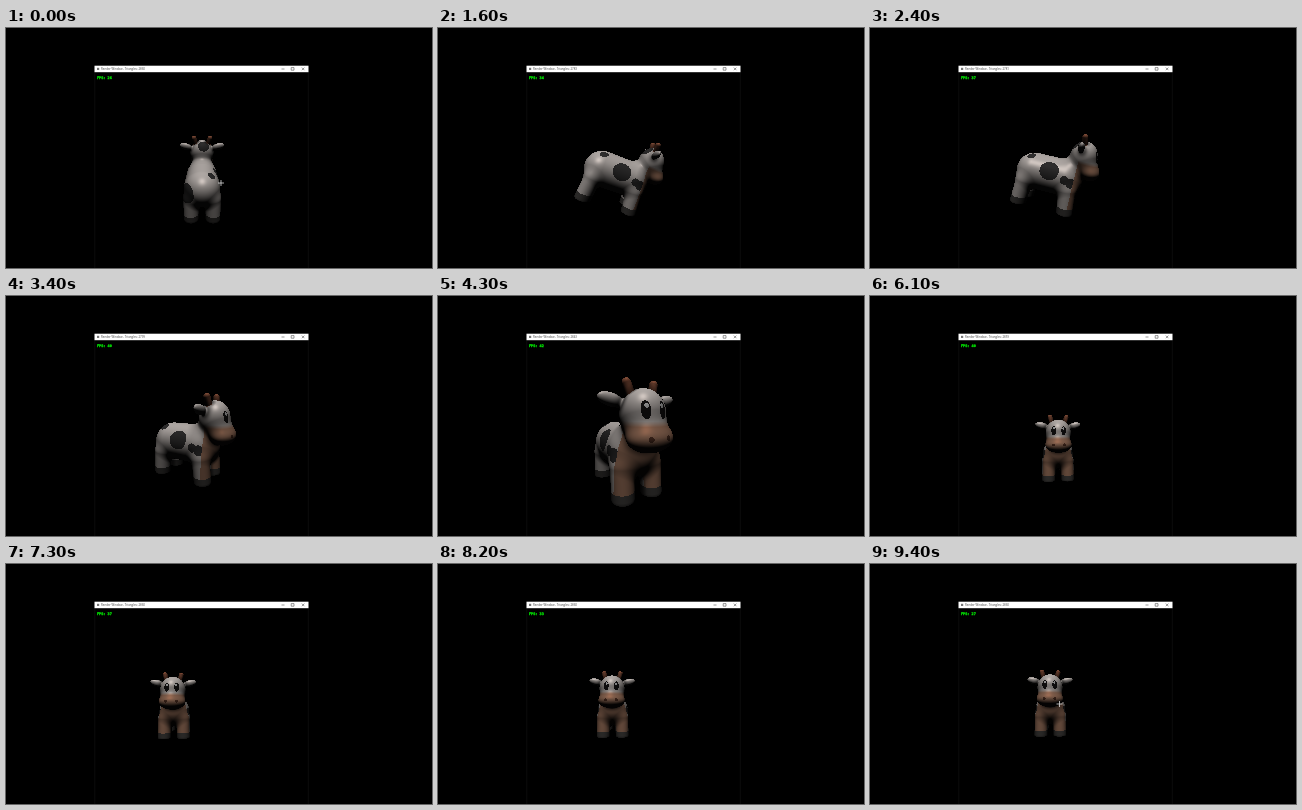
These frames come from a looping animation (426x240 px, 9.5 s). An HTML page with a canvas:

```html
<!DOCTYPE html>
<html lang="en">
<head>
<meta charset="utf-8">
<title>Render window</title>
<style>
  html, body { margin: 0; width: 100%; height: 100%; overflow: hidden; background: #000; }
  canvas, svg { position: absolute; display: block; }
  canvas { left: 89px; top: 44px; filter: blur(.5px); }
  svg { left: 0; top: 0; }
  .title { font: 2.9px "Open Sans", "Noto Sans", sans-serif; fill: #444; }
  .fps { font: bold 3.5px "DejaVu Sans Mono", monospace; fill: #0d0; stroke: #0d0; stroke-width: .35; }
</style>
</head>
<body>
<canvas id="view" width="213" height="196"></canvas>
<svg width="426" height="240" viewBox="0 0 426 240">
  <path d="M88.8 44V240M302.3 44V240" stroke="#151515" stroke-width=".6"/>
  <rect x="88.5" y="37.7" width="214" height="6.5" fill="#fff"/>
  <rect x="91" y="39.8" width="2.2" height="2.2" fill="#777"/>
  <text class="title" x="95" y="42" id="title"></text>
  <path d="M275.5 41h3M285.2 39.6h2.8v2.6h-2.8zM295.8 39.6l2.6 2.6m0-2.6l-2.6 2.6" fill="none" stroke="#333" stroke-width=".5"/>
  <text class="fps" x="91" y="51" id="fps"></text>
  <path id="cursor" d="M-3 0H3M0-3V3" stroke="#ddd" stroke-width=".8"/>
</svg>
<script>
const LOOP = 9500, STEP = 100, FOCAL = 144, CX = 195.5, CY = 142;
const { sqrt, abs, min, max, sin, cos, PI } = Math;
const $ = id => document.getElementById(id);
const canvas = $("view"), ctx = canvas.getContext("2d");
const W = canvas.width, H = canvas.height;
const image = ctx.createImageData(W, H);

const PAUSE = 4700, ZOOM = 5100;
const poses = [
  { t: 700, yaw: 180, pitch: 22, roll: 0, x: 196, y: 153, dist: 8.2 },
  { t: 1600, yaw: 102, pitch: 6, roll: 22, x: 179, y: 146, dist: 7.7 },
  { t: 3400, yaw: 61, pitch: 14, roll: 0, x: 181, y: 146, dist: 7.3 },
  { t: PAUSE, yaw: 18, pitch: 8, roll: 0, x: 187, y: 150, dist: 5.6 },
  { t: ZOOM, yaw: 11.5, pitch: 8, roll: 0, x: 182.6, y: 143, dist: 3.13 },
  { t: 6100, yaw: 5, pitch: 2, roll: 0, x: 187.5, y: 155, dist: 10 },
  { t: 7300, yaw: 4, pitch: 2, roll: 0, x: 170, y: 146, dist: 10 },
  { t: 9000, yaw: 4, pitch: 2, roll: 0, x: 181, y: 144, dist: 10 }
];

const cursors = [
  { from: 0, to: 800, x: 215, y: 155 },
  { from: ZOOM, to: 5400, x: 191.5, y: 147 },
  { from: 9000, to: LOOP, x: 189.5, y: 140 }
];

// dark patches: x, y, z, radius
const spots = [
  [-.9, .35, .1, .45], [-.95, .08, .88, .2], [.75, 0, -1.3, .5],
  [-.5, .85, -1, .24], [-.1, 1.8, 1, .34]
];

const clamp = (v, a = 0, b = 1) => v < a ? a : v > b ? b : v;
const mix = (a, b, k) => a + (b - a) * k;
const ease = k => k * k * (3 - 2 * k);

function poseAt(t) {
  if (t < ZOOM) t = min(t, PAUSE);
  const i = poses.findIndex(p => p.t > t);
  if (i === 0) return poses[0];
  if (i < 0) return poses[poses.length - 1];
  const a = poses[i - 1], b = poses[i], k = ease((t - a.t) / (b.t - a.t));
  return Object.fromEntries(Object.keys(a).map(n => [n, mix(a[n], b[n], k)]));
}

function smin(a, b, r) {
  const h = max(r - abs(a - b), 0) / r;
  return min(a, b) - h * h * r * .25;
}

function ellipsoid(x, y, z, a, b, c) {
  x /= a; y /= b; z /= c;
  const k = sqrt(x * x + y * y + z * z);
  x /= a; y /= b; z /= c;
  return k * (k - 1) / (sqrt(x * x + y * y + z * z) + 1e-6);
}

function capsule(x, y, z, dx, dy, dz, r) {
  const k = clamp((x * dx + y * dy + z * dz) / (dx * dx + dy * dy + dz * dz));
  x -= dx * k; y -= dy * k; z -= dz * k;
  return sqrt(x * x + y * y + z * z) - r;
}

const muzzle = (x, y, z) => ellipsoid(x, y - .58, z - 1.93, .73, .43, .52);
const horn = (x, y, z) => capsule(abs(x) - .38, y - 1.85, z - 1.4, .1, .33, -.05, .14);

function cow(x, y, z) {
  const ax = abs(x), az = abs(z);
  const leg = capsule(ax - .55, y + .5, az - 1.1, .02, -1.05, .1, .4);
  let d = capsule(x, y, z + .8, 0, 0, 1.6, .93);
  d = smin(d, max(leg, -1.62 - y), .3);
  d = smin(d, capsule(x, y - .3, z - .9, 0, .6, .4, .55), .3);
  let h = ellipsoid(x, y - 1.25, z - 1.5, .73, .78, .68);
  h = smin(h, muzzle(x, y, z), .4);
  h = smin(h, ellipsoid(ax - .95, y - 1.68 - (ax - .95) * .2, z - 1.3, .4, .2, .14), .12);
  return min(smin(d, h, .12), horn(x, y, z));
}

function paint(x, y, z) {
  const ax = abs(x);
  if (horn(x, y, z) < .02) return [125, 75, 55];
  const ex = (ax - .27) / .13, ey = (y - 1.38) / .25;
  if (z > 1.7 && ex * ex + ey * ey < 1) {
    const gx = ax - .25, gy = y - 1.5;
    return gx * gx + gy * gy < .004 ? [180, 180, 180] : [22, 20, 20];
  }
  const nx = ax - .28, ny = y - .62;
  if (z > 2 && nx * nx + ny * ny < .006) return [75, 46, 34];
  if (y < -1.28) return [62, 60, 58];
  const k = z > 1.3 ? clamp((1.08 - y) / .15) : 0;
  if (k > 0) return [mix(178, 145, k), mix(171, 107, k), mix(167, 86, k)];
  for (const [a, b, c, r] of spots) {
    const u = x - a, v = y - b, w = z - c;
    if (u * u + v * v + w * w < r * r) return [48, 47, 47];
  }
  const u = ax - .95, w = z - 1.2;
  return u * u + y * y + w * w < .06 ? [48, 47, 47] : [178, 171, 167];
}

function axes({ yaw, pitch, roll }) {
  const rad = PI / 180;
  const sy = sin(yaw * rad), cy = cos(yaw * rad), sp = sin(pitch * rad), cp = cos(pitch * rad);
  const sr = sin(roll * rad), cr = cos(roll * rad);
  return [[1, 0, 0], [0, 1, 0], [0, 0, 1]].map(([x, y, z]) => {
    const u = x * cy + z * sy, w = z * cy - x * sy;
    const v = y * cp - w * sp;
    return [u * cr + v * sr, v * cr - u * sr, w * cp + y * sp];
  });
}

function render(pose) {
  const m = axes(pose), data = image.data;
  const toModel = (x, y, z) => m.map(c => c[0] * x + c[1] * y + c[2] * z);
  const scale = pose.dist / FOCAL;
  const [ox, oy, oz] = toModel((CX - pose.x) * scale, (pose.y - CY) * scale, pose.dist);
  // bounding sphere around the whole animal
  const bx = ox, by = oy - .2, bz = oz - .4;
  const bound = bx * bx + by * by + bz * bz - 8.41;
  data.fill(0);
  for (let j = 0; j < H; j++) for (let i = 0; i < W; i++) {
    const vx = (i + 89.5 - CX) / FOCAL, vy = (CY - j - 44.5) / FOCAL;
    const len = sqrt(vx * vx + vy * vy + 1);
    const ux = vx / len, uy = vy / len, uz = -1 / len;
    const dx = m[0][0] * ux + m[0][1] * uy + m[0][2] * uz;
    const dy = m[1][0] * ux + m[1][1] * uy + m[1][2] * uz;
    const dz = m[2][0] * ux + m[2][1] * uy + m[2][2] * uz;
    const b = bx * dx + by * dy + bz * dz, q = b * b - bound;
    if (q < 0) continue;
    const far = sqrt(q) - b;
    let t = max(.05, -b - sqrt(q)), hit = false;
    for (let n = 0; n < 48 && t < far; n++) {
      const d = cow(ox + dx * t, oy + dy * t, oz + dz * t);
      if (d < .004) { hit = true; break; }
      t += d * .9;
    }
    if (!hit) continue;
    const x = ox + dx * t, y = oy + dy * t, z = oz + dz * t, e = .01;
    let nx = cow(x + e, y, z) - cow(x - e, y, z);
    let ny = cow(x, y + e, z) - cow(x, y - e, z);
    let nz = cow(x, y, z + e) - cow(x, y, z - e);
    const l = sqrt(nx * nx + ny * ny + nz * nz) || 1;
    nx /= l; ny /= l; nz /= l;
    const open = clamp(cow(x + nx * .3, y + ny * .3, z + nz * .3) / .3);
    const up = m[0][1] * nx + m[1][1] * ny + m[2][1] * nz;
    const out = m[0][2] * nx + m[1][2] * ny + m[2][2] * nz;
    const light = (.03 + .95 * max(0, up * .78 + out * .62)) * mix(.35, 1, open);
    const shine = 45 * max(0, up * .42 + out * .91) ** 60 * open;
    const color = paint(x, y, z), k = (j * W + i) * 4;
    for (let c = 0; c < 3; c++) {
      data[k + c] = color[c] * light + shine * (color[c] / 178) ** 2;
    }
    data[k + 3] = 255;
  }
  ctx.putImageData(image, 0, 0);
}

let shown = -1, drawn = null;
function tick(now) {
  const step = Math.floor(now % LOOP / STEP);
  if (step !== shown) {
    shown = step;
    const t = step * STEP, pose = poseAt(t), key = JSON.stringify(pose);
    if (key !== drawn) { drawn = key; render(pose); }
    const close = clamp((5 - pose.dist) / 1.8);
    const tris = mix(2820 + 40 * cos(pose.yaw * PI / 90), 1605, close);
    const fps = mix(26 + 16 * sin(PI * t / LOOP), 4, close);
    $("title").textContent = "Render Window - Triangles: " + Math.round(tris);
    $("fps").textContent = "FPS: " + Math.round(fps);
    const c = cursors.find(c => t >= c.from && t < c.to);
    $("cursor").style.display = c ? "" : "none";
    if (c) $("cursor").setAttribute("transform", `translate(${c.x} ${c.y})`);
  }
  requestAnimationFrame(tick);
}
requestAnimationFrame(tick);
</script>
</body>
</html>
```
